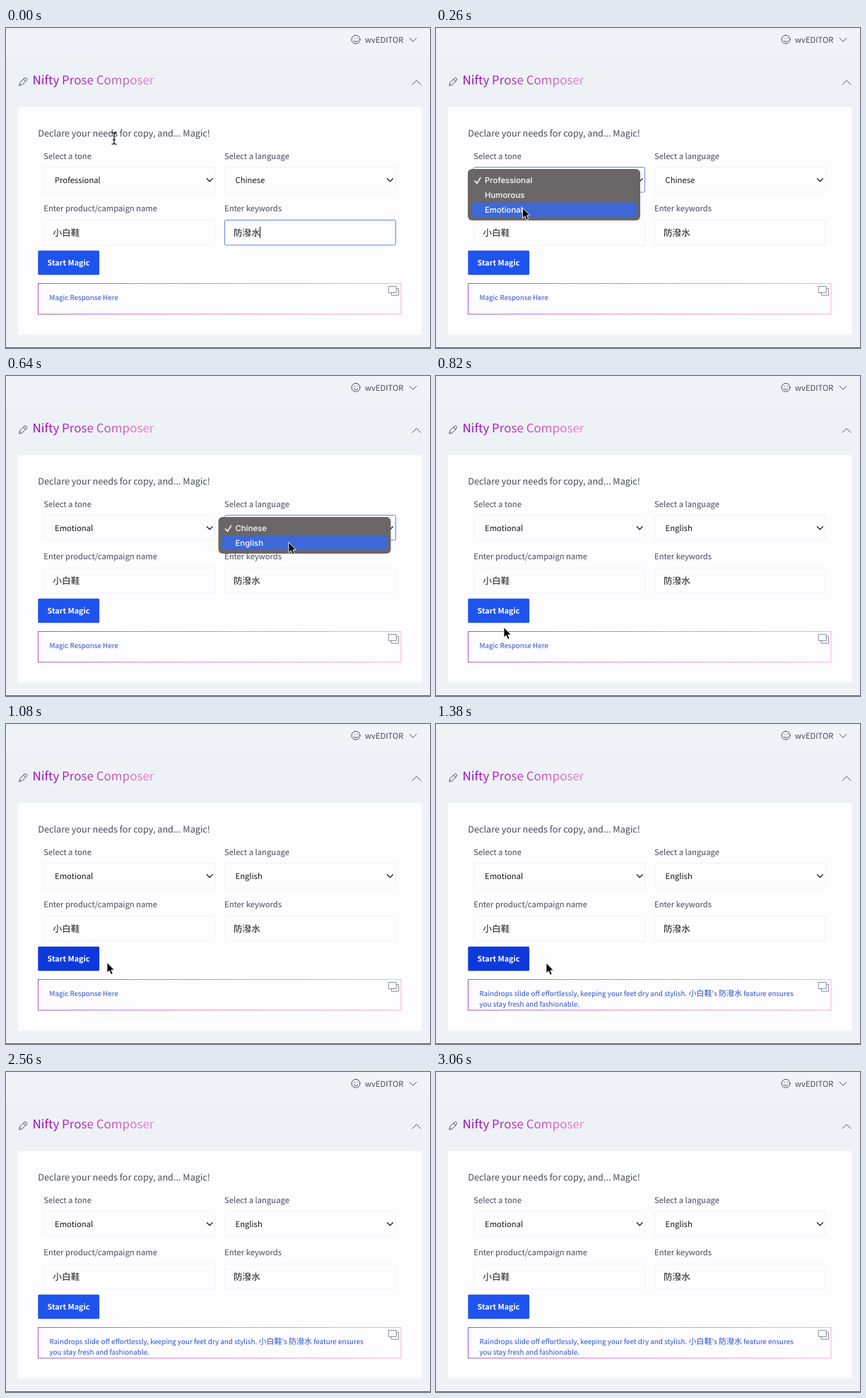
An HTML page for the animation above (3080 ms loop, 600 by 454 pixels).

```html
<!DOCTYPE html>
<html lang="en">
<head>
<meta charset="utf-8">
<title>Copy tool demo</title>
<style>
  html, body { margin: 0; width: 100%; height: 100%; overflow: hidden; background: #eef2f7; }
  svg { display: block; width: 600px; height: 454px; text-rendering: geometricPrecision;
    font-family: "Noto Sans CJK TC", "Noto Sans CJK JP", "Noto Sans CJK SC", "Noto Sans CJK", sans-serif; }
  .label { font-size: 11.25px; fill: #474b5d; }
  .value { font-size: 11.25px; fill: #15171c; }
  .han { font-size: 12.6px; fill: #15171c; }
  .answer { font-size: 9.85px; fill: #2450cc; }
  .answer tspan { font-size: 11px; }
  .toast { font-size: 11.25px; fill: #4a4d55; }
  .toast tspan { font-size: 12.6px; }
  .bold { font-size: 10.85px; font-weight: 700; }
  .menu { font: 500 11.4px Inter, sans-serif; fill: #fff; }
  .line { fill: none; stroke-linecap: round; stroke-linejoin: round; }
</style>
</head>
<body>
<svg id="stage" viewBox="0 0 600 454">
  <defs>
    <linearGradient id="titleInk" gradientUnits="userSpaceOnUse" x1="38" y1="0" x2="212" y2="0">
      <stop offset="0" stop-color="#9405b4"/><stop offset=".5" stop-color="#b944b8"/><stop offset="1" stop-color="#ec8dcd"/>
    </linearGradient>
    <linearGradient id="frameInk" gradientUnits="userSpaceOnUse" x1="45" y1="0" x2="560" y2="0">
      <stop offset="0" stop-color="#9a5acb"/><stop offset=".35" stop-color="#d67ad8"/><stop offset="1" stop-color="#f6b0e8"/>
    </linearGradient>
    <filter id="shadow" x="-10%" y="-10%" width="120%" height="125%">
      <feDropShadow dx="0" dy="1" stdDeviation="2" flood-color="#000" flood-opacity=".38"/>
    </filter>
  </defs>

  <rect width="600" height="454" fill="#eef2f7"/>
  <rect width="600" height="42" fill="#f0f3f8"/>
  <rect y="453" width="600" height="1" fill="#55585c"/>

  <g class="line" stroke="#474b5d" stroke-width="1">
    <circle cx="495" cy="16.3" r="6"/>
    <path d="M492 18q3 3.4 6 0M493 14.4v.3M497 14.4v.3"/>
    <path d="M571 14.2l5 5 5-5M575 80.4l6-6 6 6"/>
    <path d="M18.8 81.4l1.2-4.2 6.2-6.2q1.2-1 2.6.3t.5 2.8l-6.2 6.2zM24.6 72.6l3.2 3.2"/>
  </g>
  <text class="label" x="508" y="21">wvEDITOR</text>
  <text x="37.5" y="80" font-size="17" fill="url(#titleInk)">Nifty Prose Composer</text>

  <rect x="17" y="112" width="571.5" height="323" fill="#fdfcfe"/>
  <text x="45.3" y="153.7" font-size="12.66" fill="#474b5d">Declare your needs for copy, and... Magic!</text>
  <g class="label">
    <text x="53.3" y="186.2">Select a tone</text>
    <text x="309" y="186.2">Select a language</text>
    <text x="53.3" y="260.4">Enter product/campaign name</text>
    <text x="309" y="260.4">Enter keywords</text>
  </g>
  <g id="fields" fill="#fdfcfe" stroke-width="1"></g>
  <path class="line" stroke="#22252b" stroke-width="1.35" d="M284.3 213.8l3.9 3.9 3.9-3.9M539.6 213.8l3.9 3.9 3.9-3.9"/>
  <text class="value" id="tone" x="69" y="220.2"></text>
  <text class="value" id="language" x="324.5" y="220.2"></text>
  <text class="han" x="66.5" y="294.7">小白鞋</text>
  <text class="han" x="322" y="294.7">防潑水</text>
  <path id="caret" d="M359.5 282v16" stroke="#15171c"/>

  <rect id="button" x="45.3" y="315.8" width="86.8" height="34.5" rx="1.6"/>
  <text class="bold" x="58.5" y="337.2" fill="#fff">Start Magic</text>

  <rect x="45.5" y="362.5" width="513.5" height="43.5" fill="none" stroke="url(#frameInk)" stroke-width="1"/>
  <path class="line" stroke="#858a98" stroke-width="1" d="M541.7 366.6h10.6v9h-10.6zM552.6 369.6h3v9.6h-10.4v-3.4"/>
  <text class="answer" id="hint" x="61.5" y="385.6">Magic Response Here</text>
  <g class="answer" id="answer">
    <text x="61.5" y="385.6">Raindrops slide off effortlessly, keeping your feet dry and stylish. <tspan>小白鞋</tspan>'s <tspan>防潑水</tspan> feature ensures</text>
    <text x="61.5" y="401">you stay fresh and fashionable.</text>
  </g>

  <g id="toneMenu"></g>
  <g id="languageMenu"></g>

  <g id="toast">
    <rect x="332" y="-6" width="267" height="152" rx="4" fill="#fff" filter="url(#shadow)"/>
    <circle cx="360" cy="72.5" r="14.2" fill="none" stroke="#d3e8c4" stroke-width="2"/>
    <path class="line" stroke="#a0d27c" stroke-width="4" d="M352.5 73.5l5.2 5.2 10-10.6"/>
    <g class="toast">
      <text class="bold" x="394.3" y="30">Success!</text>
      <text x="394.3" y="59">Copied!: Raindrops slide off</text>
      <text x="394.3" y="75.2">effortlessly, keeping your feet dry</text>
      <text x="394.3" y="91.4">and stylish. <tspan>小白鞋</tspan>'s <tspan>防潑水</tspan></text>
      <text x="394.3" y="107.6">feature ensures you stay fresh and</text>
      <text x="394.3" y="123.8">fashionable.</text>
    </g>
  </g>

  <g id="pointer">
    <path id="arrow" d="M0 0v14.6l3.3-3 2.3 5.4 2.6-1.1-2.3-5.2h4.5z" fill="#000" stroke="#fff" stroke-width=".9" stroke-linejoin="round"/>
    <path id="beam" class="line" d="M-3 -7.5q3 0 3 2.2 0-2.2 3-2.2M0 -5.3v12M-3 8.9q3 0 3-2.2 0 2.2 3 2.2M-1.6 2.6h3.2" stroke="#1b1b1f" stroke-width="1.3"/>
  </g>
</svg>
<script>
const LOOP = 3080;
const byId = id => document.getElementById(id);
const clamp = v => Math.max(0, Math.min(1, v));
const show = (id, on) => byId(id).setAttribute("visibility", on ? "visible" : "hidden");
const write = (id, text) => { if (byId(id).textContent !== text) byId(id).textContent = text; };

const CLICK = { toneOpen: 140, tonePick: 360, languageOpen: 520, languagePick: 640, start: 900, copy: 1520 };
const ANSWER_AT = 1100;
const TOAST = { from: 1560, to: 2150 };

// Pointer stops: time, x, y
const ROUTE = [
  [0, 153, 156], [20, 153, 156], [110, 150, 215], [160, 150, 215], [270, 122, 256], [360, 122, 256],
  [420, 368, 248], [490, 410, 216], [540, 410, 216], [600, 400, 236], [660, 400, 236],
  [820, 96, 356.5], [880, 94, 336], [940, 94, 336], [1140, 156, 339], [1400, 156, 339],
  [1500, 547, 373], [1540, 547, 373], [1610, 602, 408]
];

const FIELDS = { tone: [53.5, 197.5], language: [309.5, 197.5], product: [53.5, 272.5], keywords: [309.5, 272.5] };
byId("fields").innerHTML = Object.entries(FIELDS).map(([name, [x, y]]) =>
  `<rect id="field-${name}" x="${x}" y="${y}" width="242" height="35.5" rx="2"/>`).join("");

function buildMenu(id, x, options) {
  const height = 10 + options.length * 21;
  byId(id).innerHTML = `<rect x="${x}" y="200" width="244" height="${height}" rx="6" fill="#6a6668"/>
    <rect class="bar" x="${x + 5}" width="234" height="20.5" rx="4" fill="#3d68d6"/>
    <path class="line" d="M${x + 10} 217l3 3.4 5-8" stroke="#fff" stroke-width="1.6"/>` +
    options.map((name, i) => `<text class="menu" x="${x + 24}" y="${220 + 21 * i}">${name}</text>`).join("");
}
buildMenu("toneMenu", 45, ["Professional", "Humorous", "Emotional"]);
buildMenu("languageMenu", 300.5, ["Chinese", "English"]);

function pointerAt(t) {
  const next = ROUTE.findIndex(stop => stop[0] > t);
  if (next < 0) return null;
  const [t0, x0, y0] = ROUTE[next - 1], [t1, x1, y1] = ROUTE[next];
  const k = (t - t0) / (t1 - t0), ease = k * k * (3 - 2 * k);
  return [x0 + (x1 - x0) * ease, y0 + (y1 - y0) * ease];
}

function drawMenu(id, t, opened, picked, rows, pointerY) {
  const fade = 1 - clamp((t - picked - 40) / 50);
  show(id, t >= opened && fade > 0);
  byId(id).setAttribute("opacity", fade);
  const row = t >= picked ? rows - 1 : Math.max(0, Math.min(rows - 1, Math.floor((pointerY - 205) / 21)));
  byId(id).querySelector(".bar").setAttribute("y", 205.5 + row * 21);
}

function focusedField(t) {
  if (t < CLICK.toneOpen) return "keywords";
  if (t < CLICK.languageOpen) return "tone";
  return t < CLICK.languagePick + 80 ? "language" : "";
}

function draw(t) {
  const spot = pointerAt(t);
  show("pointer", spot);
  if (spot) byId("pointer").setAttribute("transform", `translate(${spot})`);
  const overText = t < CLICK.toneOpen && spot[1] < 198;
  byId("beam").style.display = overText ? "" : "none";
  byId("arrow").style.display = overText ? "none" : "";

  const focus = focusedField(t);
  for (const name in FIELDS)
    byId("field-" + name).setAttribute("stroke", name === focus ? "#6685d6" : "#f1f1f7");
  show("caret", focus === "keywords");

  write("tone", t < CLICK.tonePick + 80 ? "Professional" : "Emotional");
  write("language", t < CLICK.languagePick + 20 ? "Chinese" : "English");
  const pointerY = spot ? spot[1] : 0;
  drawMenu("toneMenu", t, CLICK.toneOpen, CLICK.tonePick, 3, pointerY);
  drawMenu("languageMenu", t, CLICK.languageOpen, CLICK.languagePick, 2, pointerY);

  byId("button").setAttribute("fill", t >= CLICK.start && t < CLICK.copy ? "#0d39dc" : "#1f53ee");
  show("hint", t < ANSWER_AT);
  show("answer", t >= ANSWER_AT);

  const toast = Math.min(clamp((t - TOAST.from) / 80), clamp((TOAST.to - t) / 50));
  show("toast", toast > 0);
  byId("toast").setAttribute("opacity", toast);
  byId("toast").setAttribute("transform", `translate(0 ${-12 * (1 - toast)})`);
}

const began = performance.now();
function tick() {
  draw((performance.now() - began) % LOOP);
  requestAnimationFrame(tick);
}
tick();
</script>
</body>
</html>
```
